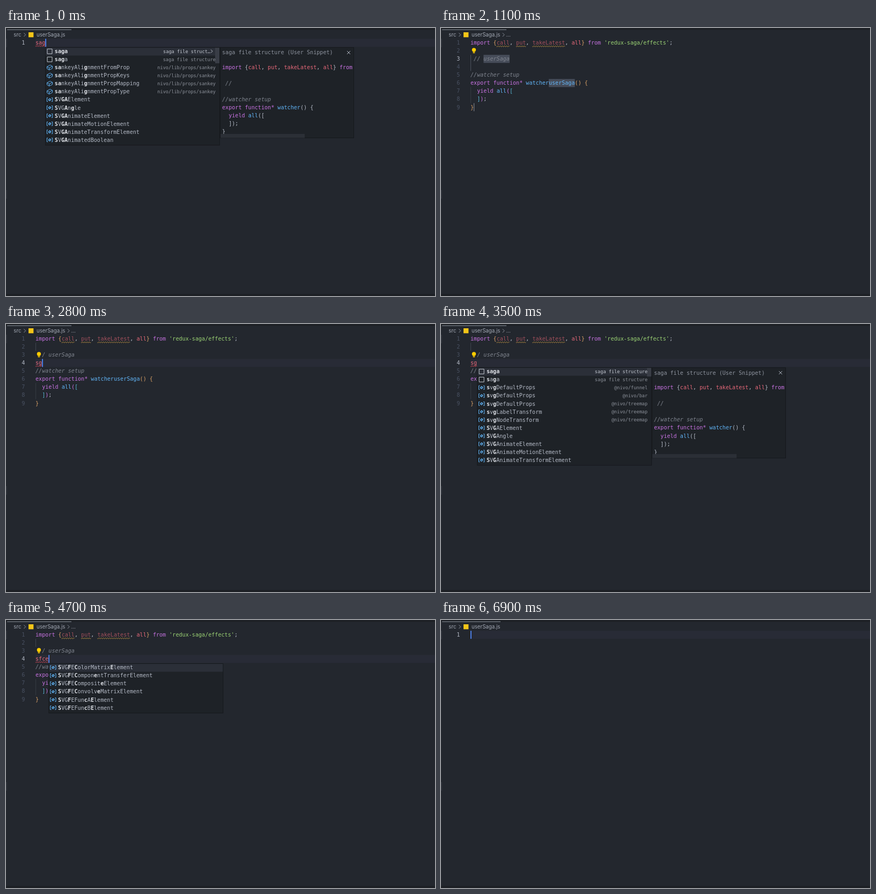
An HTML page with a canvas for the animation above (7000 ms loop, 800 px wide and 501 px high).

```html
<!DOCTYPE html>
<html lang="en">
<head>
<meta charset="utf-8">
<title>Saga snippets</title>
<style>
html, body { margin: 0; width: 100%; height: 100%; overflow: hidden; background: #23272e; }
canvas { display: block; width: 800px; height: 501px; }
</style>
</head>
<body>
<canvas id="stage"></canvas>
<script>
const W = 800, H = 501, LOOP = 7000, STEP = 100;
const CW = 6.08, LH = 15.05, LEFT = 55, TOP = 20.1;
const MONO = '"DejaVu Sans Mono", monospace';
const SANS = 'Inter, sans-serif';
const BG = '#23272e', BLUE = '#61b4f6', CARET = '#528bff';
const INK = {
  k: '#c873e2', f: '#61b4f6', r: '#e8697a', d: '#a2505c', s: '#9bd374', y: '#e5c07b',
  w: '#b4bac6', g: '#d8a066', p: '#c873e2', c: '#56b6d2', o: '#7f848e'
};

const canvas = document.getElementById('stage');
const dpr = window.devicePixelRatio || 1;
canvas.width = W * dpr;
canvas.height = H * dpr;
const ctx = canvas.getContext('2d');

// "~k" in a line switches to ink k.
const SNIPPET_DOC = [
  '~kimport ~w{~rcall~w, ~rput~w, ~rtakeLatest~w, ~rall~w} ~kfrom ',
  '', '~o //', '', '~o//watcher setup',
  '~kexport function* ~fwatcher~w() {', '~k  yield ~fall~w([', '~w  ]);', '~w}'
];
const PAYLOAD_DOC = [
  '~o//  saga', '~k export function* ~fSaga~w() {', '~k  try ~w{',
  '~k    const ~yres ~w= ~kyield ~fcall~w(~yaxios~w.~rget~w, ~s""',
  '~k    yield ~fput~w(~fSuccess~w(~yres~w.~rdata~w));',
  '~w  } ~kcatch ~w(~rerror~w) {',
  '~y    console~w.~flog~w(~rerror~w);',
  '~k    yield ~fput~w(~fFailed~w(~rerror~w));',
  '~w  }', '~w}', '~kexport function* ~fwatch~w() {',
  '~k  yield ~ftakeLatest~w(, ~rSaga~w);', '~w}'
];

const vars = names => names.map(n => ['var', n, '']);
const SAGA = ['snip', 'saga', 'saga file structure'];
const sankey = end => ['box', 'sankeyAlignment' + end, 'nivo/lib/props/sankey'];
const svgItems = ['SVGAElement', 'SVGAngle', 'SVGAnimateElement', 'SVGAnimateMotionElement',
  'SVGAnimateTransformElement', 'SVGAnimatedBoolean'];
const filters = ['SVGFEColorMatrixElement', 'SVGFEComponentTransferElement',
  'SVGFECompositeElement', 'SVGFEConvolveMatrixElement'];
const funcs = ['SVGFEFuncAElement', 'SVGFEFuncBElement'];

const sagaDoc = { head: ['saga file structure (User Snippet)'], code: SNIPPET_DOC, bar: 157 };
const payloadDoc = { head: ['saga function with payload (User Snip', 'pet)'], code: PAYLOAD_DOC, bar: 231 };
const sfcItems = [
  ['snip', 'sfc', 'saga function'], ['snip', 'sfc', 'saga function'],
  ['snip', 'sfcp', 'saga function with payload'], ['snip', 'sfcp', 'saga function with payload'],
  ...vars(['screenLeft', ...filters]),
  ['box', 'stackOrderFromProp', 'nivo/lib/props/stack'], ...vars(funcs)
];
const LISTS = {
  sag: {
    items: [['snip', 'saga', 'saga file struct…'], SAGA,
      ...['FromProp', 'PropKeys', 'PropMapping', 'PropType'].map(sankey), ...vars(svgItems)],
    doc: sagaDoc, thumb: 29, arrow: true
  },
  saga: { items: [SAGA, SAGA, sankey('PropMapping')], doc: sagaDoc, thumb: 0 },
  sg: {
    items: [SAGA, SAGA,
      ...['funnel', 'bar', 'treemap'].map(p => ['var', 'svgDefaultProps', '@nivo/' + p]),
      ...['svgLabelTransform', 'svgNodeTransform'].map(n => ['var', n, '@nivo/treemap']),
      ...vars(svgItems.slice(0, 5))],
    doc: sagaDoc, thumb: 16
  },
  sf: { items: sfcItems, doc: payloadDoc, thumb: 40 },
  sfc: { items: sfcItems, doc: payloadDoc, thumb: 79 },
  sfce: { items: vars([...filters, ...funcs]), doc: null, thumb: 0 }
};

const lineTop = n => TOP + (n - 1) * LH;
const col = c => LEFT + c * CW;

function rect(x, y, w, h, color) {
  ctx.fillStyle = color;
  ctx.fillRect(x, y, w, h);
}

function stroke(color, width, points, closed) {
  ctx.beginPath();
  points.forEach(([x, y], i) => i ? ctx.lineTo(x, y) : ctx.moveTo(x, y));
  if (closed) ctx.closePath();
  ctx.strokeStyle = color;
  ctx.lineWidth = width;
  ctx.stroke();
}

function text(str, x, mid, color, { size = 10.1, style = '', font = MONO, align = 'left' } = {}) {
  ctx.font = `${style} ${size}px ${font}`;
  ctx.textAlign = align;
  ctx.fillStyle = color;
  ctx.fillText(str, x, mid + size * 0.35);
}

function code(line, x, mid) {
  for (const part of line.split('~').slice(1)) {
    const run = part.slice(1);
    text(run, x, mid, INK[part[0]], { style: part[0] === 'o' ? 'italic' : '' });
    x += run.length * CW;
  }
}

function squiggle(x, width, y, color) {
  const points = [];
  for (let i = 0; i <= width; i += 0.5) points.push([x + i, y + Math.sin(i * Math.PI / 2) * 0.9]);
  stroke(color, 0.9, points);
}

const chevron = (x, y, s, color) => stroke(color, 1, [[x - s / 2, y - s], [x + s / 2, y], [x - s / 2, y + s]]);
const caret = (n, c) => rect(col(c), lineTop(n), 1.7, LH, CARET);

function bulb(x, y) {
  rect(x - 5, y - 6, 10, 12, BG);
  ctx.fillStyle = '#ffcc00';
  ctx.beginPath();
  ctx.arc(x, y - 1.3, 3.7, 0, 7);
  ctx.fill();
  rect(x - 1.8, y + 1.5, 3.6, 3.5, '#ffcc00');
  rect(x - 1.8, y + 2.7, 3.6, 0.6, BG);
}

function pointer(x, y) {
  for (const [color, width] of [['#f4f4f4', 3], ['#15171b', 1.2]]) {
    stroke(color, width, [[x - 3, y - 6], [x, y - 4.5], [x, y + 4.5], [x - 3, y + 6]]);
    stroke(color, width, [[x + 3, y - 6], [x, y - 4.5], [x, y + 4.5], [x + 3, y + 6]]);
    stroke(color, width, [[x - 2, y + 1.5], [x + 2, y + 1.5]]);
  }
}

function icon(kind, x, y) {
  if (kind === 'snip') {
    stroke('#c5cad3', 1, [[x - 4.5, y - 4.5], [x + 4.5, y - 4.5], [x + 4.5, y + 4.5], [x - 4.5, y + 4.5]], true);
  } else if (kind === 'box') {
    stroke(BLUE, 1, [[x - 5, y - 1.5], [x + 1, y - 4.5], [x + 5, y - 2.3], [x + 5, y + 1.7],
      [x - 1, y + 4.7], [x - 5, y + 2.3]], true);
    stroke(BLUE, 1, [[x - 5, y - 1.5], [x - 1, y + 0.8], [x + 5, y - 2.3]]);
    stroke(BLUE, 1, [[x - 1, y + 0.8], [x - 1, y + 4.7]]);
  } else {
    for (const s of [-1, 1]) {
      stroke(BLUE, 1, [[x + s * 3.3, y - 3.5], [x + s * 5.2, y - 3.5], [x + s * 5.2, y + 3.5], [x + s * 3.3, y + 3.5]]);
    }
    stroke(BLUE, 1.1, [[x - 2.5, y], [x, y - 2.3], [x + 2.5, y], [x, y + 2.3]], true);
    stroke(BLUE, 0.9, [[x - 2, y + 2], [x + 2, y - 2]]);
  }
}

// Positions of the query letters in a label, also with the last letters swapped.
function matches(label, query) {
  const find = q => {
    let from = 0;
    return [...q].map(ch => {
      const at = from < 0 ? -1 : label.toLowerCase().indexOf(ch, from);
      from = at < 0 ? -1 : at + 1;
      return at;
    });
  };
  const hit = find(query);
  if (!hit.includes(-1)) return hit;
  return find(query.slice(0, -2) + query.slice(-1) + query.slice(-2, -1));
}

function panel(x, y, w, h) {
  rect(x, y, w, h, '#16191d');
  rect(x + 1, y + 1, w - 2, h - 2, '#1e2227');
}

function popup(query, x, n) {
  const { items, doc, thumb, arrow } = LISTS[query];
  const y = lineTop(n + 1) + 0.8;
  panel(x, y, 326, items.length * LH + 3);
  rect(x + 1, y + 1, 324, LH - 0.5, '#2b2f38');
  rect(x + 317, y + 1, 8, thumb, '#393d46');
  items.forEach(([kind, label, desc], i) => {
    const mid = y + 7.7 + i * LH;
    const hits = matches(label, query);
    icon(kind, x + 8.5, mid);
    [...label].forEach((ch, j) => {
      const bold = !i && kind === 'snip' || hits.includes(j);
      text(ch, x + 17.8 + j * CW, mid, bold ? '#dfe2e8' : '#b4bac6', { style: bold ? 'bold' : '' });
    });
    text(desc, x + (arrow && !i ? 308 : 318), mid + 0.3, i ? '#8d929b' : '#c3c8d1', { size: 8.6, align: 'right' });
  });
  if (arrow) chevron(x + 310.5, y + 7.5, 3, '#c3c8d1');
  if (doc) details(doc, x + 326, y);
}

function details(doc, x, y) {
  const first = y + 10 + (doc.head.length - 1) * LH + 27.6;
  const h = first + (doc.code.length - 1) * LH + 12 - y;
  panel(x, y, 250, h);
  ctx.save();
  ctx.beginPath();
  ctx.rect(x, y, 248.5, h);
  ctx.clip();
  doc.head.forEach((s, i) => text(s, x + 4, y + 10 + i * LH, '#8e949f'));
  doc.code.forEach((s, i) => code(s, x + 4, first + i * LH));
  ctx.restore();
  rect(x + 1, y + h - 8, doc.bar, 7.5, '#2b2f36');
  const cx = x + 240, cy = y + 10;
  stroke('#b4bac6', 1, [[cx - 3, cy - 3], [cx + 3, cy + 3]]);
  stroke('#b4bac6', 1, [[cx + 3, cy - 3], [cx - 3, cy + 3]]);
}

function chrome(t) {
  rect(0, 0, W, H, BG);
  rect(0, 0, W, 3.5, '#1d2025');
  rect(2, 2.6, t >= 5500 ? 109 : 120, 1, '#9298a2');
  rect(0, 497, W, 4, '#1d2025');
  rect(0, 20, 2, 16, '#2e323a');
  rect(0, 303, 2, 16, '#2e323a');
  const label = (s, x) => text(s, x, 12.7, '#a2a8b3', { size: 9.7, font: SANS });
  label('src', 14.3);
  chevron(35, 12.7, 3.3, '#8e949f');
  rect(42, 8, 9.3, 9.3, '#f5c518');
  label('userSaga.js', 57);
  if (t >= 1000 && t < 5800) {
    chevron(116.5, 12.7, 3.3, '#8e949f');
    label('…', 121.5);
  }
}

function number(n, active) {
  text(String(n), 35.3, lineTop(n) + 7.5, active ? '#b4bac6' : '#495162', { align: 'right' });
}

const activeBar = n => rect(LEFT, lineTop(n), W - LEFT, LH, '#282b36');

// A file that holds a single line.
function single(t) {
  activeBar(1);
  number(1, true);
  if (t >= 5500) {
    if (t < 6500 || t >= 6900) caret(1, 0);
    return;
  }
  const word = t < 100 ? 'sag' : 'saga';
  code('~r' + word, LEFT, lineTop(1) + 7.5);
  squiggle(LEFT, 18, lineTop(1) + 13.5, '#e0444f');
  caret(1, word.length);
  popup(t < 200 ? 'sag' : 'saga', t < 200 ? 73 : 79, 1);
}

function typed(t) {
  if (t < 2500 || t >= 3600 && t < 3700) return t < 2500 ? '' : 's';
  if (t < 2800) return 's';
  if (t < 3600) return 'sg';
  if (t < 3900) return 'sf';
  return t < 4500 ? 'sfc' : 'sfce';
}

function openList(t) {
  if (t >= 2900 && t < 3600) return 'sg';
  if (t >= 3800 && t < 4000) return 'sf';
  if (t >= 4000 && t < 4600) return 'sfc';
  return t >= 4600 && t < 4900 ? 'sfce' : '';
}

function selection(lengths) {
  lengths.forEach((len, i) => {
    const last = i === lengths.length - 1;
    ctx.fillStyle = '#3a4150';
    ctx.beginPath();
    ctx.roundRect(LEFT, lineTop(i + 1), (len + (last ? 0 : 1)) * CW, LH + 0.2, [0, 2, 2, 0]);
    ctx.fill();
  });
}

function file(t) {
  const snippet = t < 1500, selected = t >= 5200;
  const name = 'userSaga'.slice(0, t < 700 ? 0 : (Math.floor((t - 700) / 100) + 1) * 2);
  const word = typed(t);
  const active = t < 1800 ? 3 : selected ? 9 : 4;
  const u = t < 700 ? 'r' : 'd';
  const lines = [
    `~kimport ~g{~${u}call~w, ~${u}put~w, ~${u}takeLatest~w, ~rall~g} ~kfrom ~s'redux-saga/effects'~w;`,
    '~w ', '~o // ' + name, '~r' + word, '~o//watcher setup',
    `~kexport function* ~fwatcher${name}~g() {`,
    '~k  yield ~fall~p(~c[', '~c  ]~p)~w;', '~g}'
  ];
  const plain = lines.map(s => s.replace(/~./g, ''));

  if (active === 4) activeBar(4);
  if (selected) selection(plain.map(s => s.length));
  if (snippet && name) {
    rect(col(4), lineTop(3), name.length * CW, LH, '#464c59');
    rect(col(24), lineTop(6), name.length * CW, LH, '#464c59');
  }
  if (!selected) {
    if (t < 2400) rect(LEFT, lineTop(3), 1, snippet ? LH * 2 : LH, '#4b515c');
    else rect(LEFT, lineTop(2), 1, LH, '#3f444e');
    rect(LEFT, lineTop(7), 1, LH * 2, '#343942');
  }

  lines.forEach((s, i) => {
    number(i + 1, i + 1 === active);
    code(s, LEFT, lineTop(i + 1) + 7.5);
    if (!selected) return;
    [...plain[i]].forEach((ch, j) => {
      if (ch === ' ') rect(col(j) + 2.6, lineTop(i + 1) + 7.2, 1, 1, '#646b78');
    });
  });
  if (t >= 700) {
    for (const [c, len] of [[8, 4], [14, 3], [19, 10]]) {
      squiggle(col(c), len * CW, lineTop(1) + 14.2, '#c99a45');
    }
  }
  if (t >= 2600 && word) squiggle(LEFT, word.length * CW, lineTop(4) + 13.5, '#e0444f');
  if (t >= 1100) bulb(61.4, lineTop(t < 2400 ? 2 : 3) + 7);

  if (snippet) {
    rect(col(1), lineTop(9), 1, LH, '#8a8f99');
    if (t < 1100) {
      caret(3, 4 + name.length);
      caret(6, 24 + name.length);
    }
  } else if (selected) {
    caret(9, 1);
  } else if (active === 4 && openList(t) !== 'sg') {
    caret(4, word.length);
  }
  const list = openList(t);
  if (list) popup(list, col(list.length), 4);
}

function mouse(t) {
  const glide = (from, to, start, time) => {
    const p = Math.min(1, Math.max(0, (t - start) / time));
    const e = p * p * (3 - 2 * p);
    pointer(from[0] + (to[0] - from[0]) * e, from[1] + (to[1] - from[1]) * e);
  };
  if (t >= 1500 && t < 2500) glide([165, 118], [71, 72], 1500, 300);
  if (t >= 5800 && t < 6200) glide([71, 70], [211, 14], 5800, 300);
}

function draw(now) {
  const t = Math.floor(now % LOOP / STEP) * STEP;
  ctx.setTransform(dpr, 0, 0, dpr, 0, 0);
  chrome(t);
  if (t < 400 || t >= 5500) single(t);
  else file(t);
  mouse(t);
}

const start = performance.now();
function tick() {
  draw(performance.now() - start);
  requestAnimationFrame(tick);
}
tick();
</script>
</body>
</html>
```
